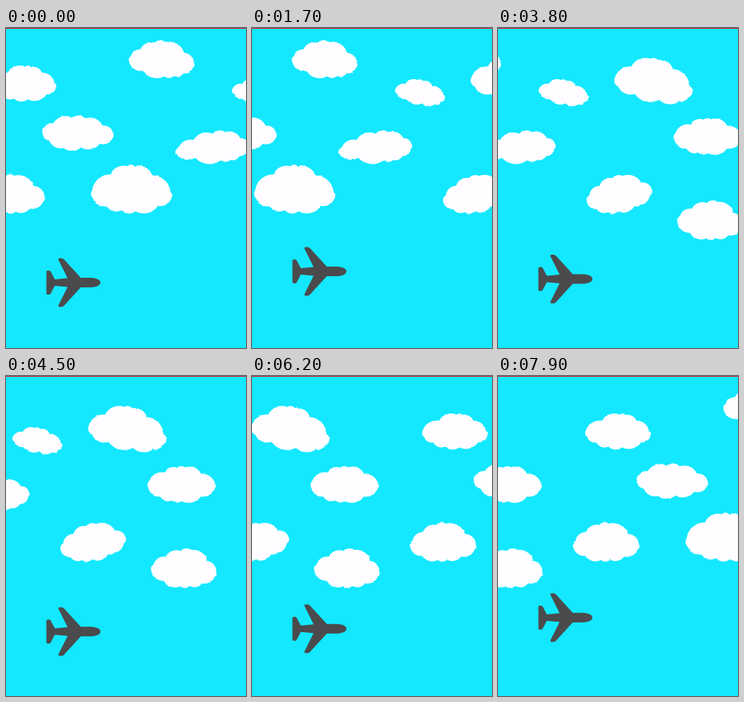
Write an HTML page that moves like this. It is 300 px wide and 401 px high and loops after 8 s.

```html
<!DOCTYPE html>
<html lang="en">
<head>
<meta charset="utf-8">
<title>Plane among clouds</title>
<style>
  html, body { margin: 0; width: 100%; height: 100%; overflow: hidden; background: #13e8ff; }
  svg { display: block; width: 100%; height: 100%; }
</style>
</head>
<body>
<svg viewBox="0 0 300 401" preserveAspectRatio="none">
  <defs>
    <filter id="rough" color-interpolation-filters="sRGB">
      <feTurbulence type="fractalNoise" baseFrequency=".25" seed="4"/>
      <feDisplacementMap in="SourceGraphic" scale="2.500" xChannelSelector="R" yChannelSelector="G"/>
      <feGaussianBlur stdDeviation=".5"/>
    </filter>
    <path id="half" d="M50.5 1V-13.5Q50.5 -15 52 -15H54Q55.5 -15 56 -13.5L61 -4L77 -5.5L65.5 -28.5Q65 -30.5 67 -30.5H69.5Q71 -30.5 72.5 -29L93.5 -6H107Q118 -5 118 0V1Z"/>
  </defs>
  <rect width="300" height="401" fill="#13e8ff"/>
  <g id="sky">
    <g id="clouds" fill="#fffdff" filter="url(#rough)"></g>
    <use href="#clouds" x="610"/>
  </g>
  <g id="plane" fill="#4b4b4d">
    <use href="#half"/>
    <use href="#half" transform="scale(1 -1)"/>
  </g>
  <rect width="300" height="1" fill="#d4242e"/>
</svg>
<script>
const byId = id => document.getElementById(id);
const clouds = byId('clouds'), sky = byId('sky'), plane = byId('plane');
const BUMPS = 12;

const power = (v, k) => Math.sign(v) * Math.abs(v) ** k;

// A lopsided superellipse in the box x, y, w, h, edged with round bumps.
// peak and dip place its top and bottom across the box, left and right its ends down the box.
function cloud(x, y, w, h, peak, dip, left, right) {
  const rim = [...Array(BUMPS)].map((_, i) => {
    const jitter = 0.2 * Math.sin(5 * i + x);
    const angle = (i + 0.5 + jitter) / BUMPS * 2 * Math.PI;
    const c = Math.cos(angle), s = Math.sin(angle), k = s < 0 ? 1.5 : 1.25;
    const midX = w * (s < 0 ? peak : dip), midY = h * (c < 0 ? left : right);
    return [
      x + midX + power(c, k) * (c < 0 ? midX : w - midX),
      y + midY + power(s, k) * (s < 0 ? midY : h - midY)
    ];
  });
  let d = 'M' + rim[BUMPS - 1];
  rim.forEach((p, i) => {
    const q = rim.at(i - 1);
    const radius = 0.75 * Math.hypot(p[0] - q[0], p[1] - q[1]);
    d += `A${radius} ${radius} 0 0 1 ${p}`;
  });
  const path = document.createElementNS('http://www.w3.org/2000/svg', 'path');
  path.setAttribute('d', d);
  clouds.append(path);
}

cloud(153, 16, 83, 45, 0.5, 0.6, 0.53, 0.67);
cloud(-20, 48, 83, 42, 0.57, 0.5, 0.55, 0.6);
cloud(282, 65, 63, 31, 0.48, 0.75, 0.42, 0.72);
cloud(45, 111, 92, 40, 0.48, 0.35, 0.43, 0.6);
cloud(210, 130, 94, 36, 0.65, 0.7, 0.7, 0.47);
cloud(105, 172, 103, 58, 0.5, 0.5, 0.62, 0.66);
cloud(-35, 184, 84, 47, 0.5, 0.47, 0.6, 0.63);
cloud(376, 38, 99, 54, 0.5, 0.8, 0.53, 0.78);
cloud(342, 185, 83, 46, 0.5, 0.37, 0.68, 0.4);
cloud(450, 114, 87, 43, 0.52, 0.45, 0.5, 0.55);
cloud(455, 217, 83, 47, 0.58, 0.5, 0.49, 0.65);

const LOOP = 8000, STEP = 100, SPEED = 0.061;
const LOW = 325.5, RISE = 24.5, TOP_TIME = 2170, HALF = 2965;

// Triangle wave: the plane climbs and sinks at constant speed.
function planeY(t) {
  const phase = Math.abs(t - TOP_TIME) / HALF % 2;
  return LOW - RISE * Math.abs(1 - phase);
}

function draw() {
  const t = Math.floor(performance.now() % LOOP / STEP) * STEP;
  sky.setAttribute('transform', `translate(${-SPEED * t})`);
  plane.setAttribute('transform', `translate(0 ${planeY(t)})`);
  requestAnimationFrame(draw);
}
draw();
</script>
</body>
</html>
```
